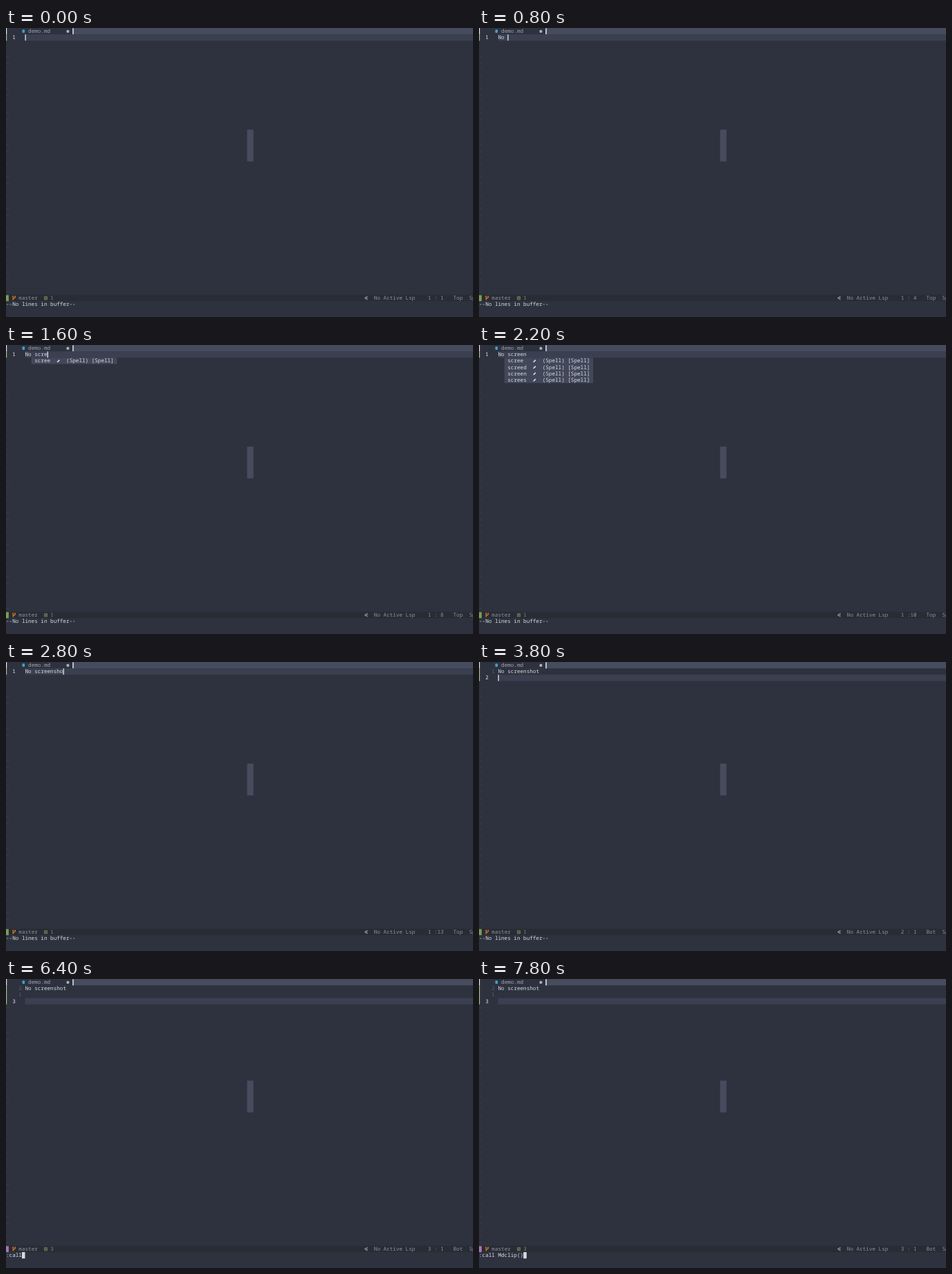
These frames come from a looping animation (675x417 px, 8 s). An HTML page:

```html
<!DOCTYPE html>
<html lang="en">
<head>
<meta charset="utf-8">
<title>Editor typing</title>
<style>
html, body { margin: 0; width: 100%; height: 100%; overflow: hidden; background: #2e323e; }
svg { display: block; width: 675px; height: 417px; }
text {
  font: 7.64px "Noto Sans Mono", "DejaVu Sans Mono", monospace;
  white-space: pre;
  text-rendering: geometricPrecision;
}
</style>
</head>
<body>
<svg id="stage" viewBox="0 0 675 417" xmlns="http://www.w3.org/2000/svg"></svg>
<script>
const LOOP = 8000, CW = 4.585, RH = 9.165;
const STATUS = 42, CMD = 43;
const C = {
  bg: '#2e323e', line: '#3b4051', bar: '#464c5e', menu: '#424859', status: '#282c35',
  text: '#d5dae4', muted: '#8d929e', dim: '#596071', tilde: '#434958', light: '#e3e7ee',
  green: '#7f9d55', sign: '#a3be8c', red: '#bf616a', purple: '#a876b5',
  orange: '#e5801f', blue: '#3f9fd0'
};
const stage = document.getElementById('stage');

function add(parent, tag, attrs, content) {
  const el = document.createElementNS('http://www.w3.org/2000/svg', tag);
  for (const k in attrs) el.setAttribute(k, attrs[k]);
  if (content !== undefined) el.textContent = content;
  parent.appendChild(el);
  return el;
}
const rect = (g, x, y, width, height, fill, rx = 0) =>
  add(g, 'rect', { x, y, width, height, fill, rx });
const label = (g, col, row, s, fill = C.text) =>
  add(g, 'text', { x: col * CW, y: row * RH + 7.15, fill }, s);
const cells = (g, col, row, w, h, fill) =>
  rect(g, col * CW, row * RH, w * CW, h * RH, fill);

// Fixed parts of the window
function drawBase(g) {
  rect(g, 0, 0, 675, 417, C.bg);
  cells(g, 21, 0, 130, 1, C.bar);
  rect(g, 0, 0, 1.2, RH, C.light);
  rect(g, 96.2, 0.4, 1.5, 8.9, C.light);
  rect(g, 23.5, 2.3, 3.6, 4.8, C.blue, 1);
  label(g, 7, 0, 'demo.md', '#a0a5b0');
  add(g, 'circle', { cx: 89.4, cy: 4.9, r: 2.1, fill: '#adb1ba' });
  for (let r = 4; r < STATUS; r++) label(g, 0, r, '~', C.tilde);
  cells(g, 0, STATUS, 150, 1, C.status);
  const branch = { fill: 'none', stroke: C.orange, 'stroke-width': 1.1 };
  add(g, 'path', { d: 'M10.2 387.2V392.8M13.2 387.4V388.6Q13.2 390 10.2 390.7', ...branch });
  add(g, 'circle', { cx: 10.2, cy: 387.3, r: 0.9, fill: C.orange });
  add(g, 'circle', { cx: 13.2, cy: 387.5, r: 0.9, fill: C.orange });
  label(g, 4, STATUS, 'master', C.muted);
  add(g, 'path', {
    d: 'M55.6 387.6H59.4V391.9H55.6ZM56.4 389.7H58.6M57.5 388.6V390.8',
    fill: 'none', stroke: '#8f9e6b', 'stroke-width': 0.75
  });
  add(g, 'path', {
    d: 'M522.6 387.2L518.4 389.6L522.6 392M522.7 388.6H519.7V390.6H522.7',
    fill: 'none', stroke: '#9a9eaa', 'stroke-width': 0.9
  });
  label(g, 116, STATUS, 'No Active Lsp', C.muted);
  label(g, 146, STATUS, 'Sp', C.muted);
}

function drawMenu(g, words) {
  const w = Math.max(...words.map(s => s.length));
  cells(g, 8, 2, w + 22, words.length, C.menu);
  words.forEach((s, i) => {
    const row = i + 2, x = (w + 11) * CW, y = row * RH;
    label(g, 9, row, s);
    add(g, 'path', {
      d: `M${x + 0.2} ${y + 6.9}L${x + 0.8} ${y + 5.1}L${x + 3.3} ${y + 2.6}L${x + 4.5} ${y + 3.8}L${x + 2} ${y + 6.3}Z`,
      fill: C.text
    });
    label(g, w + 14, row, '(Spell) [Spell]');
  });
}

const FULL = 'No screenshot';
const ONE = ['scree'];
const FOUR = ['scree', 'screed', 'screen', 'screes'];
const COMMAND = ':call Mdclip()';

// Each key press: [time, characters shown]
const typed = [[0, 0], [400, 1], [600, 2], [800, 3], [1000, 4], [1200, 5], [1400, 6], [1600, 7],
  [1800, 8], [2200, 9], [2400, 10], [2600, 11], [2800, 12], [3000, 13]];
const commands = [[0, 0], [5000, 1], [5400, 2], [6000, 3], [6200, 4], [6400, 5], [6600, 6],
  [6800, 7], [7200, 8], [7400, 14]];
const menus = [[0, null], [1600, ONE], [2000, FOUR], [2800, null]];
const modes = [[0, 'insert'], [4600, 'normal'], [5000, 'command']];
const at = (track, t) => track.reduce((v, [time, next]) => t >= time ? next : v, track[0][1]);

function drawState(g, t) {
  const count = at(typed, t), menu = at(menus, t), mode = at(modes, t);
  const row = t < 3800 ? 1 : t < 4000 ? 2 : 3;
  const col = row === 1 ? count : 0;

  rect(g, 6 * CW, row * RH, 675 - 6 * CW, RH, C.line);
  rect(g, 0, RH, 1.2, row * RH, C.sign);
  for (let r = 1; r < row; r++) label(g, 4, r, row - r, C.dim);
  label(g, 2, row, row, C.light);
  label(g, 6, 1, FULL.slice(0, count));
  if (menu) drawMenu(g, menu);
  cells(g, 76, 16, 2, 5, C.bar);

  const redraw = t >= 2200 && t < 2400;
  if (mode === 'insert' && !redraw) rect(g, (6 + col) * CW, row * RH + 0.2, 1.3, 8.9, C.light);
  if (mode === 'normal') cells(g, 6, row, 1, 1, C.text);

  const tint = { insert: C.green, normal: C.red, command: C.purple }[mode];
  rect(g, 0, STATUS * RH + 0.5, 3.9, 8.7, tint);
  label(g, 14, STATUS, t < 4200 ? 1 : 3, '#7f8a70');
  label(g, 133, STATUS, `${row} :${String(col + 1).padStart(2)}`, C.muted);
  label(g, 141, STATUS, row === 1 ? 'Top' : 'Bot', C.muted);

  if (t < 4800) label(g, 0, CMD, '--No lines in buffer--');
  if (mode === 'command') {
    const n = at(commands, t);
    label(g, 0, CMD, COMMAND.slice(0, n));
    cells(g, n, CMD, 1, 1, C.text);
  }
}

drawBase(add(stage, 'g', {}));
const live = add(stage, 'g', {});
let shown = -1;

function frame() {
  const step = Math.floor(performance.now() % LOOP / 200);
  if (step !== shown) {
    shown = step;
    live.replaceChildren();
    drawState(live, step * 200);
  }
  requestAnimationFrame(frame);
}
frame();
</script>
</body>
</html>
```
